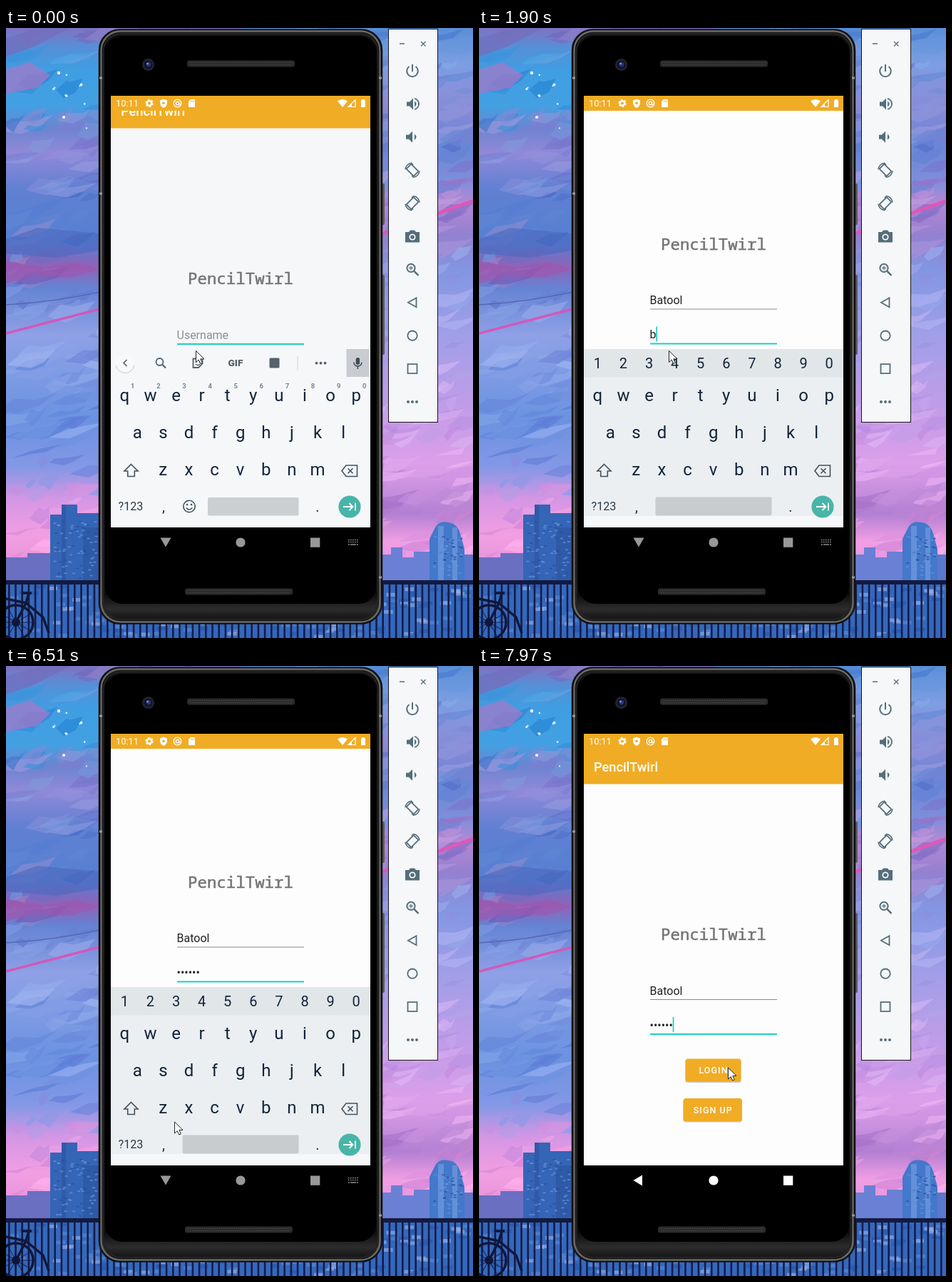
Animation, 655 px wide and 855 px high, one loop 8000 ms. Source, as an HTML page:

```html
<!DOCTYPE html>
<html lang="en">
<head>
<meta charset="utf-8">
<title>Login screen</title>
<style>
html, body { margin: 0; width: 100%; height: 100%; overflow: hidden; background: #7f90d8; }
svg { display: block; }
text { font-family: Roboto, "Noto Sans", sans-serif; white-space: pre; }
.mono { font-family: "Noto Sans Mono", "DejaVu Sans Mono", monospace; }
</style>
</head>
<body>
<svg id="stage" width="655" height="855" viewBox="0 0 655 855"></svg>
<script>
const LOOP = 8000;
const APP = 'PencilTwirl', USER = 'Batool', SECRET = 'batool';
const ORANGE = '#f0ac24', TEAL = '#1ccfc0', INK = '#546e7a';

// ---- markup helpers
const rect = (x, y, w, h, fill, more = '') => `<rect x="${x}" y="${y}" width="${w}" height="${h}" fill="${fill}" ${more}/>`;
const disc = (x, y, r, fill, more = '') => `<circle cx="${x}" cy="${y}" r="${r}" fill="${fill}" ${more}/>`;
const path = (d, fill, more = '') => `<path d="${d}" fill="${fill}" ${more}/>`;
const line = (d, color, w = 2, more = '') => `<path d="${d}" fill="none" stroke="${color}" stroke-width="${w}" ${more}/>`;
const text = (x, y, size, fill, str, more = '') => `<text x="${x}" y="${y}" font-size="${size}" fill="${fill}" ${more}>${str}</text>`;
const mid = 'text-anchor="middle"';
const group = (x, y, body, more = '') => `<g transform="translate(${x} ${y})" ${more}>${body}</g>`;

// ---- painted sky
let seed = 11;
const rnd = () => (seed = (seed * 16807) % 2147483647) / 2147483647;
const spread = n => (rnd() - 0.5) * 2 * n;

const leftSky = [[0, '#7f72c2'], [28, '#5590d8'], [60, '#3f9ee2'], [110, '#43a0e2'], [140, '#6c84d0'], [175, '#9089d8'],
  [225, '#6180d2'], [300, '#5580d2'], [335, '#9062b6'], [365, '#6484d4'], [430, '#8fa0e6'], [480, '#7f9ce4'], [550, '#6b92e0'],
  [615, '#8398e6'], [660, '#d496e4'], [710, '#f29ee2'], [775, '#e08fd8'], [855, '#a98ad2']];
const rightSky = [[0, '#5a8fd8'], [50, '#7c9ee2'], [110, '#8c8ad6'], [160, '#6686d6'], [215, '#7f8eda'], [245, '#b487d4'],
  [290, '#9480d0'], [340, '#8296e2'], [430, '#a19ee8'], [540, '#c49ce8'], [610, '#dc9fea'], [655, '#c48cdc'], [680, '#b17fd2'],
  [720, '#f29fe4'], [775, '#d792e0'], [855, '#a08ad4']];

const rgb = hex => [1, 3, 5].map(i => parseInt(hex.slice(i, i + 2), 16));
function skyAt(stops, y) {
  let i = 1;
  while (i < stops.length - 1 && stops[i][0] < y) i++;
  const [y0, a] = stops[i - 1], [y1, b] = stops[i];
  const k = Math.min(1, Math.max(0, (y - y0) / (y1 - y0))), A = rgb(a), B = rgb(b);
  return A.map((v, j) => v + (B[j] - v) * k);
}
function sky(id, stops, x0, x1) {
  const marks = stops.map(([y, c]) => `<stop offset="${y / 855}" stop-color="${c}"/>`).join('');
  let out = `<linearGradient id="${id}" x2="0" y2="1">${marks}</linearGradient>` + rect(x0, 0, x1 - x0, 855, `url(#${id})`);
  for (let i = 0; i < 320; i++) {
    const x = x0 + rnd() * (x1 - x0), y = rnd() * 770, w = 10 + rnd() * 32, h = 3 + rnd() * 9;
    const light = spread(26);
    const color = skyAt(stops, y + spread(34)).map((v, j) => Math.round(v + light * (j < 2 ? 1 : 0.5)));
    const pts = [[-w, 0], [-w * 0.4, -h], [w * 0.3, -h * 0.7], [w, -h * 0.9], [w * 0.5, h * 0.4], [-w * 0.2, h]]
      .map(([a, b]) => (x + a + spread(5)).toFixed(1) + ',' + (y + b - a * 0.18 + spread(3)).toFixed(1));
    out += `<polygon points="${pts.join(' ')}" fill="rgb(${color})" opacity=".65"/>`;
  }
  return out;
}

function city() {
  let s = '';
  s += path('M0 742H30V736H62V775H0Z', '#6a6fc2') + path('M62 682H78V668H100V680H131V775H62Z', '#3565b6');
  s += path('M78 668H84V775H78ZM108 700H131V775H108Z', '#2a549f', 'opacity=".6"');
  s += path('M527 738H540V728H556V742H572V734H596V775H527Z', '#6a80d4');
  s += path('M594 775V716L602 700Q608 690 620 693Q634 694 638 712L643 730V775Z', '#4478ca');
  s += path('M606 698h8v77h-8ZM626 700h7v75h-7Z', '#6f9ae0', 'opacity=".7"') + rect(643, 738, 12, 37, '#5a78cc');
  for (let i = 0; i < 130; i++) {
    const left = i < 75, x = left ? 64 + rnd() * 64 : 598 + rnd() * 40, y = left ? 690 + rnd() * 80 : 712 + rnd() * 58;
    s += rect(x.toFixed(1), y.toFixed(1), 4, 1.8, i % 3 ? '#6a96dc' : '#234f9c', 'opacity=".7"');
  }
  s += rect(0, 775, 655, 80, '#3468bc');
  for (let i = 0; i < 170; i++) {
    const color = ['#2456ac', '#5b8ad4', '#9db4ea'][i % 3];
    s += rect((rnd() * 645).toFixed(1), (780 + rnd() * 72).toFixed(1), 13, 5, color, 'opacity=".6"');
  }
  for (let x = 3; x < 655; x += 9.2) s += rect(x.toFixed(1), 778, 2.6, 77, '#151c48');
  s += rect(0, 774, 655, 6, '#141a40');
  const dark = '#11173a';
  s += disc(14, 833, 24, 'none', `stroke="${dark}" stroke-width="3.5"`) + disc(14, 833, 6, dark);
  for (let a = 0; a < 6; a++) s += line('M14 809V857', dark, 0.8, `transform="rotate(${a * 30} 14 833)"`);
  return s + line('M0 800L28 806L14 833M28 806L52 826L60 848M22 792H36M28 806L32 792', dark, 3.5);
}

function backdrop() {
  let s = sky('skyL', leftSky, 0, 330) + sky('skyR', rightSky, 330, 655);
  s += path('M0 58L34 48L62 66L44 84L0 92Z', '#a878c8', 'opacity=".7"') + path('M0 14L50 0H90L40 26L0 40Z', '#7270be', 'opacity=".8"');
  s += path('M0 326L52 336L98 328L131 338L92 350L40 348L0 358Z', '#a055b0', 'opacity=".6"');
  s += path('M0 296L44 280L131 288V312L70 322L0 316Z', '#4d68be', 'opacity=".6"');
  s += line('M0 388Q70 384 131 370', '#5468b4', 1.6) + line('M0 428L131 394', '#d258ba', 3.5);
  s += line('M520 291L655 242', '#e255b6', 4.5);
  for (let i = 0; i < 9; i++) s += disc((66 + rnd() * 50).toFixed(1), (56 + rnd() * 85).toFixed(1), 1 + rnd(), '#d8f2ff');
  s += disc(74, 63, 2.2, '#fff') + disc(81, 125, 2, '#fff');
  return s + city();
}

// ---- phone body
function speaker(x, y) {
  return rect(x, y, 151, 9, '#2b2b2b', 'rx="3"') +
    line(`M${x + 3} ${y + 3}H${x + 148}M${x + 4} ${y + 6}H${x + 148}`, '#4b4b4b', 1.2, 'stroke-dasharray="1.5 1.5"');
}
function phone() {
  let s = rect(525, 218, 6, 58, '#5c5b60', 'rx="2"') + rect(525, 346, 6, 112, '#5c5b60', 'rx="2"');
  s += `<linearGradient id="body" x2="0" y2="1"><stop offset="0" stop-color="#1c1c1c"/><stop offset=".03" stop-color="#060606"/><stop offset=".95" stop-color="#0c0c0c"/><stop offset=".975" stop-color="#2c2c2c"/><stop offset="1" stop-color="#0b0b0b"/></linearGradient>`;
  s += rect(130.5, 2, 397, 833, 'url(#body)', 'rx="29" stroke="#101010" stroke-width="1.5"');
  s += rect(133.5, 4.5, 391, 828, 'none', 'rx="27" stroke="#6b6a68" stroke-width="2.4"');
  s += rect(136.5, 8, 385, 821, 'none', 'rx="25" stroke="#242424" stroke-width="2"');
  s += rect(139, 11, 380, 796, '#000', 'rx="24"') + line('M131 70H135M131 232H135M523 70H527M523 770H527', '#999', 3);
  s += speaker(254, 45.5) + speaker(251, 785.5);
  s += disc(199.5, 51.5, 8.5, '#24252c') + disc(199.5, 51.5, 6, '#111430') + disc(200, 51, 3.2, '#26367c') + disc(198.5, 50, 1.3, '#8ba0ea');
  return s;
}

// ---- emulator tool strip
function tools() {
  const st = (d, w = 2) => line(d, INK, w);
  const horn = path('M-8 -3H-4L1 -8V8L-4 3H-8Z', INK);
  const turn = rect(-7.2, -4.8, 14.4, 9.6, 'none', `rx="1" transform="rotate(45)" stroke="${INK}" stroke-width="1.8"`) +
    st('M-10 -1A10 10 0 0 1 -1.5 -10L1 -7.5M10 1A10 10 0 0 1 1.5 10L-1 7.5', 1.5);
  const icons = [
    st('M0 -9V1M-4.5 -6A7.8 7.8 0 1 0 4.5 -6'),
    horn + path('M3 -4Q8 0 3 4Z', INK) + st('M3 -7.5A7.7 7.7 0 0 1 3 7.5', 1.9),
    group(-1, 0, horn) + path('M3 -4Q8 0 3 4Z', INK),
    turn,
    `<g transform="scale(-1 1)">${turn}</g>`,
    path('M-10 -6H-5L-3 -8.5H3L5 -6H10V8.5H-10Z', INK) + disc(0, 1, 4.6, '#f5f7f9') + disc(0, 1, 2.8, INK),
    disc(-2, -2, 5.6, 'none', `stroke="${INK}" stroke-width="2"`) + st('M2.5 2.5L8.5 8.5', 2.4) + st('M-5 -2H1M-2 -5V1', 1.3),
    st('M5.5 -6.5V6.5L-6 0Z', 1.8),
    disc(0, 0, 6.7, 'none', `stroke="${INK}" stroke-width="1.8"`),
    st('M-6.5 -6.5H6.5V6.5H-6.5Z', 1.8),
    [-6, 0, 6].map(x => disc(x, 0, 2, INK)).join('')
  ];
  return rect(536.5, 1.5, 69, 551, '#f5f7f9', 'stroke="#16161c" stroke-width="1"') +
    line('M552 22H559M582 19L588.5 25.5M588.5 19L582 25.5', INK, 1.3) +
    icons.map((d, i) => group(570, (60 + i * 46.4).toFixed(1), d)).join('');
}

// ---- app content, laid out with no keyboard open
function button(x, y, w, label) {
  return rect(x, y + 1.5, w, 32, '#000', 'rx="3.5" opacity=".22"') + rect(x, y, w, 32, ORANGE, 'rx="3.5"') +
    text(x + w / 2 + 0.5, y + 20.7, 12.4, '#fff', label, `${mid} font-weight="500" letter-spacing="1.1"`);
}
function content() {
  return rect(147, 95, 364, 70.5, ORANGE) +
    text(161, 148, 18.2, '#fff', APP, 'font-weight="500"') +
    text(329, 384, 22.4, '#737373', APP, `class="mono" ${mid} font-weight="500" stroke="#737373" stroke-width=".5"`) +
    text(239.5, 460.5, 16, '#222', '', 'id="name"') + rect(240, 462, 45, 1, '#333', 'id="compose"') +
    rect(240, 467, 178, 2, TEAL, 'id="nameLine"') +
    text(239.5, 508.8, 16, '#222', '', 'id="pass"') + rect(240, 515, 178, 2, TEAL, 'id="passLine"') +
    rect(239, 491.8, 1.7, 21, TEAL, 'id="caret"') +
    button(289.5, 550.5, 78, 'LOGIN') + button(286.5, 606, 82.5, 'SIGN UP');
}
function statusBar() {
  let s = rect(147, 95, 364, 21, ORANGE) + text(154, 110.2, 12.8, '#fff', '10:11');
  s += disc(201, 105.5, 3.3, 'none', 'stroke="#fff" stroke-width="2.4"') + disc(201, 105.5, 4.9, 'none', 'stroke="#fff" stroke-width="1.6" stroke-dasharray="2.6 2.5"');
  s += path('M221 99.5L226 101.5V105Q226 109.5 221 112Q216 109.5 216 105V101.5Z', '#fff') + disc(221, 105.3, 1.8, ORANGE);
  s += disc(240.5, 105.5, 5.3, 'none', 'stroke="#fff" stroke-width="1.3"') + disc(240.5, 105.5, 2.2, 'none', 'stroke="#fff" stroke-width="1.3"') + line('M242.5 103V107Q244 108 244.5 106', '#fff', 1.1);
  s += path('M259 100H265V111H256V103Z', '#fff') + line('M259.5 101.5V104M261.5 101.5V104M263.5 101.5V104', ORANGE, 0.9);
  s += path('M465 102.5Q472 97.5 479 102.5L472 111Z', '#fff') + path('M490 100.5V110.5H480Z', 'none', 'stroke="#fff" stroke-width="1.2"') + path('M485 105.5V110.5H480Z', '#fff');
  return s + path('M498 101.3H499.5V100H502.5V101.3H504V111H498Z', '#fff');
}

// ---- keyboard
const KEY = 36.1;
const keyRow = (str, x, y, size = 24) => [...str].map((c, i) => text((x + i * KEY).toFixed(1), y, size, '#12243a', c, mid)).join('');

function keys() {
  const g = '#44505c';
  return keyRow('qwertyuiop', 166.3, 522.5) + keyRow('asdfghjkl', 184.3, 574.5) + keyRow('zxcvbnm', 220.3, 627) +
    text(157.5, 676.3, 16.2, '#2d3a48', '?123') + text(221, 678, 20, '#222d3a', ',', mid) + text(437, 678, 20, '#222d3a', '.', mid) +
    path('M175.5 611.5L185 621H180.3V628.5H170.7V621H166Z', 'none', `stroke="${g}" stroke-width="1.6"`) +
    path('M477 613H492.5V628.5H477L471 620.7Z', 'none', `stroke="${g}" stroke-width="1.6"`) + line('M479.5 617.3L486.5 624.3M486.5 617.3L479.5 624.3', g, 1.6) +
    disc(482, 671, 15.6, '#48b5a8') + line('M473 671H486M481.5 666L486.5 671L481.5 676M490 665.5V676.5', '#fff', 1.8);
}
function textBoard() {
  const g = '#55626c';
  let s = rect(147, 450, 364, 250, '#f5f7f9') + rect(477.5, 450, 31.5, 39, '#c9cdd1');
  s += rect(490.7, 462, 5.4, 10, '#3f4b54', 'rx="2.7"') + line('M487.8 468.5A5.6 5.6 0 0 0 499 468.5M493.4 474V478', '#3f4b54', 1.5);
  const bar = disc(215.5, 468, 5, 'none', `stroke="${g}" stroke-width="1.8"`) + line('M219 471.5L224 476.5', g, 2.2) +
    path('M262.5 463.5H275.5V470.5L270 476H262.5Z', 'none', `stroke="${g}" stroke-width="1.8"`) + disc(266.5, 468, 1, g) + disc(271.5, 468, 1, g) + line('M266 471Q269 474 272 471', g, 1.3) +
    text(322, 474, 13.6, g, 'GIF', `${mid} font-weight="900"`) + rect(369.5, 462.5, 14, 14, g, 'rx="1.5"') +
    rect(408.5, 460, 1, 20, '#d2d6d9') + [435.5, 441.5, 447.5].map(x => disc(x, 469.7, 1.9, g)).join('');
  s += `<g id="iconBar">${bar}</g>`;
  s += `<g id="suggest">${rect(164, 450, 285, 30, '#e0e4e7')}${text(328, 475.5, 16, '#606a72', '', 'id="word" ' + mid)}</g>`;
  s += disc(167, 469.5, 13.3, '#f9fafb', 'id="knob"') + line('M154 473A13.3 13.3 0 0 0 180 473', '#c6cbcf', 1) + line('', '#4a5560', 1.5, 'id="chevron"');
  s += [...'1234567890'].map((c, i) => text((177.8 + i * KEY).toFixed(1), 505, 9.5, '#6a727a', c, `${mid} font-weight="500"`)).join('');
  s += rect(283, 658, 127.5, 25.5, '#cccfd2', 'rx="2"');
  s += disc(257, 670.5, 8.2, 'none', 'stroke="#44505c" stroke-width="1.6"') + disc(254, 668, 1.3, '#44505c') + disc(260, 668, 1.3, '#44505c') + line('M252.7 672.5Q257 677.5 261.3 672.5', '#44505c', 1.5);
  return s + keys();
}
function passBoard() {
  return rect(147, 450, 364, 251, '#f5f7f9') + rect(147, 450, 364, 234, '#ebeff2') + rect(147, 450, 364, 39.5, '#e1e6e9') +
    keyRow('1234567890', 166.3, 477, 20) + rect(247.5, 657.5, 163, 26, '#c8cccf', 'rx="2"') + keys();
}

// ---- assemble
document.getElementById('stage').innerHTML = backdrop() + phone() + tools() +
  `<clipPath id="screen">${rect(147, 95, 364, 605, '#fff')}</clipPath><g clip-path="url(#screen)">` +
  rect(147, 95, 364, 605, '#fdfdfd', 'id="page"') + rect(164, 419, 285, 31, '#fefefe', 'id="patch"') +
  `<g id="content">${content()}</g><g id="textBoard">${textBoard()}</g><g id="passBoard">${passBoard()}</g>${statusBar()}</g>` +
  rect(177, 701, 92, 41.5, '#2d2d2d', 'id="ripple"') +
  `<g id="nav">${path('M216.5 714.5H231.5L224 727.5Z', 'inherit', 'id="back"')}<circle cx="329" cy="721" r="6.6"/><rect x="427" y="714.5" width="13.3" height="13.3"/></g>` +
  `<g id="navKeys">${line('M480 717.5H494M480 720.5H494', '#8f8f8f', 1.5, 'stroke-dasharray="1.6 1.4"')}${line('M480 724H494', '#8f8f8f', 1.5, 'stroke-dasharray="2 1 8 1"')}</g>` +
  path('M0 0V16L3.7 12.6L6.3 18L8.8 16.9L6.3 11.4H11.5Z', '#fff', 'id="mouse" stroke="#222" stroke-width="1" stroke-linejoin="round"');

const el = {};
document.querySelectorAll('[id]').forEach(n => el[n.id] = n);
const set = (id, attrs) => { for (const k in attrs) el[id].setAttribute(k, attrs[k]); };
const show = (id, on) => set(id, { visibility: on ? 'visible' : 'hidden' });
const write = (id, str) => { if (el[id].textContent !== str) el[id].textContent = str; };

// ---- timing: each entry holds from its time on
const at = (t, steps) => { let v = steps[0][1]; for (const [s, x] of steps) if (t >= s) v = x; return v; };
const nameLen = [[0, 0], [260, 2], [530, 3], [650, 4], [800, 5], [920, 6]];
const passLen = [[0, 0], [1900, 1], [2050, 2], [2200, 4], [2350, 5], [3090, 4], [3340, 3], [3460, 1], [3770, 0],
  [4350, 1], [4470, 2], [4590, 3], [4710, 5], [4960, 6]];
const peek = [[0, 1], [3090, 0], [4350, 1], [6510, 0]];
const caretOn = [[0, 0], [260, 1], [1590, 0], [1900, 1], [2790, 0], [3090, 1], [4200, 0], [4350, 1], [5420, 0], [5990, 1],
  [6510, 0], [6900, 1], [7450, 0], [7970, 1]];
const pans = [[0, 25], [1200, 40], [1320, 66], [1470, 72], [1590, 73.5], [7580, 30], [7700, 0]];
const board = [[0, [0, 1]], [7310, [1.5, 0.95]], [7450, [26, 0.6]], [7580, [90, 0.2]], [7700, [250, 0]]];
const mouseAt = [[0, [266.5, 452.5]], [6270, [262, 485]], [6390, [249, 565]], [6510, [236.5, 639]], [6630, [225, 688]], [6750, [219, 708]],
  [6900, [216, 722]], [7450, [236, 700]], [7580, [312, 615]], [7700, [375, 540]], [7850, [363, 554]], [7970, [349.5, 563]]];

function draw(t) {
  const onName = t < 1200, typed = at(t, nameLen), n = at(t, passLen), pan = at(t, pans);
  set('page', { fill: onName ? '#f5f7f9' : '#fdfdfd' });
  show('patch', onName && typed > 0);
  set('content', { transform: `translate(0 ${-pan})` });

  const name = USER.slice(0, typed);
  write('name', name || 'Username');
  set('name', { fill: typed ? '#222' : '#8c8f92' });
  const nameW = typed ? el.name.getComputedTextLength() : 0;
  set('compose', { width: nameW });
  show('compose', onName && typed > 0);
  set('nameLine', { fill: onName ? TEAL : '#8a8a8a', height: onName ? 2 : 1 });
  set('passLine', { fill: onName ? '#8a8a8a' : TEAL });

  const shown = n && at(t, peek) ? '•'.repeat(n - 1) + SECRET[n - 1] : '•'.repeat(n);
  write('pass', shown || 'Password');
  set('pass', { fill: n ? '#222' : '#8c8f92' });
  const passW = n ? el.pass.getComputedTextLength() : 0;
  set('caret', { x: 239.3 + (onName ? nameW : passW), y: onName ? 444 : 492 });
  show('caret', at(t, caretOn));

  show('textBoard', onName);
  el.iconBar.style.display = typed ? 'none' : '';
  el.suggest.style.display = typed ? '' : 'none';
  write('word', name);
  set('knob', { fill: typed ? '#fff' : '#f7f9fa' });
  set('chevron', { d: typed ? 'M165 465L169.5 469.5L165 474' : 'M169.5 465L165 469.5L169.5 474' });
  const [dy, alpha] = at(t, board);
  show('passBoard', !onName && alpha > 0);
  set('passBoard', { transform: `translate(0 ${dy})`, opacity: alpha });

  set('nav', { fill: at(t, [[0, '#989898'], [7160, '#bdbdbd'], [7310, '#e2e2e2'], [7580, '#fff']]) });
  set('back', { d: t < 7580 ? 'M216.5 714.5H231.5L224 727.5Z' : 'M229 713.5V728.5L216.5 721Z' });
  const small = t < 7310;
  show('navKeys', small);
  set('ripple', { x: small ? 207 : 177.5, width: small ? 33 : 92, rx: small ? 16 : 20, opacity: at(t, [[0, 0], [7160, 0.8], [7310, 1], [7450, 0.7], [7580, 0.35], [7700, 0]]) });
  set('mouse', { transform: `translate(${at(t, mouseAt)})` });
}

let start = null;
function tick(now) {
  if (start === null) start = now;
  draw((now - start) % LOOP);
  requestAnimationFrame(tick);
}
draw(0);
requestAnimationFrame(tick);
</script>
</body>
</html>
```
